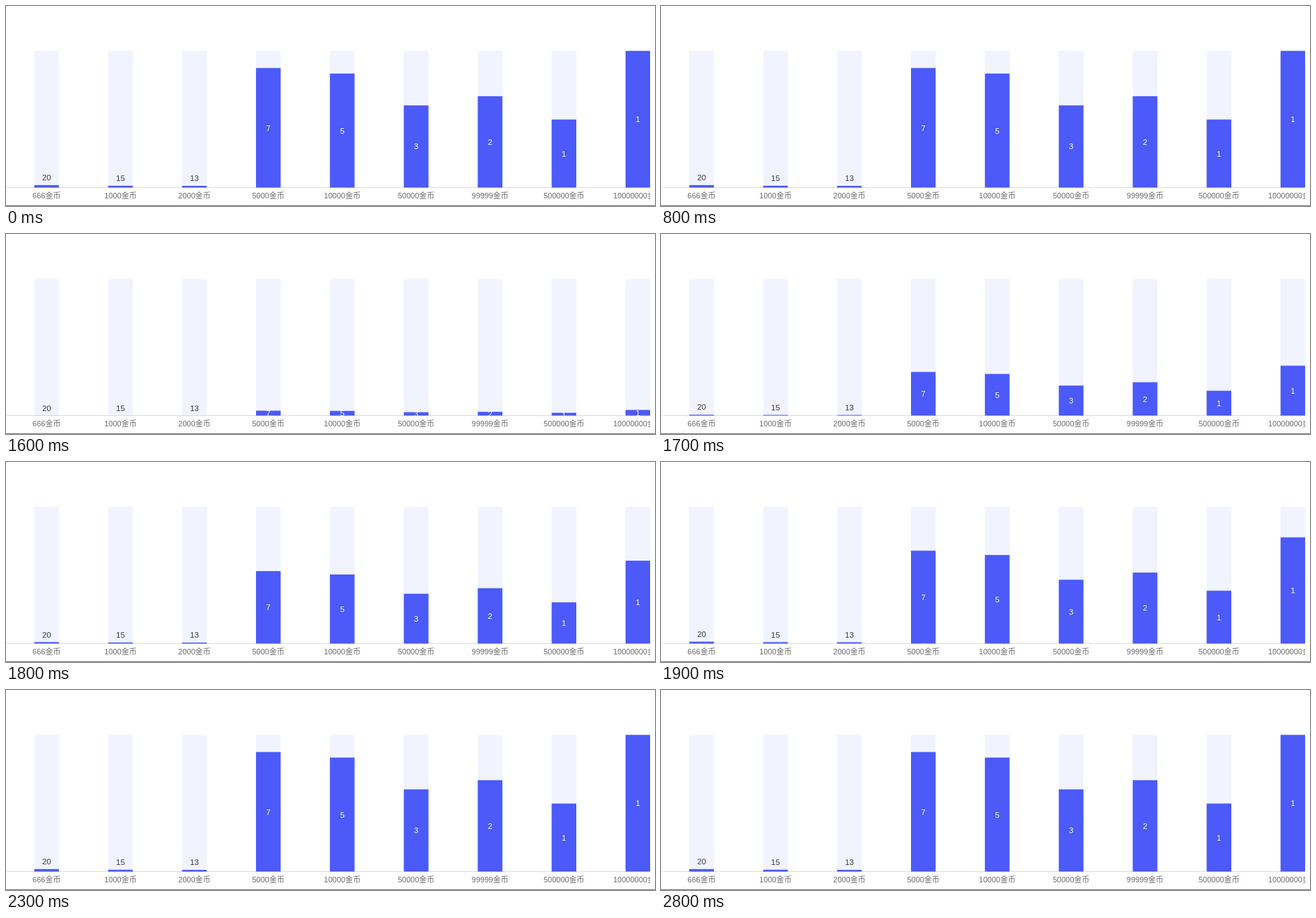
Write an HTML page that moves like this. It is 932 by 288 pixels and loops after 3300 ms.

```html
<!DOCTYPE html>
<html lang="zh">
<head>
<meta charset="utf-8">
<title>Bar chart reload</title>
<style>
  html, body { margin: 0; width: 100%; height: 100%; overflow: hidden; background: #fff; }
  svg { display: block; }
  text { text-anchor: middle; font-family: "Liberation Sans", "Noto Sans CJK SC", "Noto Sans CJK", sans-serif; }
  .axis { font-size: 11px; fill: #6a6a6d; }
  .value { font-size: 11.5px; }
</style>
</head>
<body>
<svg width="932" height="288" viewBox="0 0 932 288">
  <defs><clipPath id="view"><rect width="925" height="288"/></clipPath></defs>
  <rect width="932" height="288" fill="#fff"/>
  <g id="chart" clip-path="url(#view)">
    <rect y="261" width="925" height="1" fill="#dcdce0"/>
  </g>
  <g id="loader" fill="none" stroke="#6b6d78" stroke-width="1.5" stroke-linecap="round">
    <rect x="323.5" y="233" width="2" height="4" fill="#5c5e6a" stroke="none"/>
    <rect x="393" y="232" width="2" height="4" fill="#5c5e6a" stroke="none"/>
    <rect x="323.5" y="217" width="72" height="44.5" fill="#fcfcfe" stroke="#c6c8d4" stroke-width="1"/>
    <rect x="326.5" y="217" width="66" height="40.5" fill="#fff" stroke="#b9bbc9" stroke-width="1"/>
    <rect x="327" y="217.5" width="11.5" height="39.5" fill="#e8e9f3" stroke="none"/>
    <path d="M338.5 217.5V257" stroke="#b9bbc9" stroke-width="1"/>
    <path d="M329 222h7.5M329 225h7.5M329 228h7.5" stroke-width="1"/>
    <rect x="341" y="219.5" width="49" height="6.5" rx="1" fill="#5f616c" stroke="none"/>
    <g fill="#fff" stroke="none"><circle cx="344" cy="222.7" r="1"/><circle cx="347.3" cy="222.7" r="1"/></g>
    <g fill="#eff0f7" stroke="#cfd1dd" stroke-width="1">
      <rect x="341.5" y="228.5" width="26.5" height="25.5"/>
      <rect x="370.5" y="228.5" width="19.5" height="25.5"/>
    </g>
    <path d="M355 241.5V233.5A8 8 0 1 0 363 241.5Z" fill="#5f616c" stroke="none"/>
    <path d="M356 240.5V233A8 8 0 0 1 363.5 240.5Z" fill="#fff" stroke="none"/>
    <path d="M372.5 234h15M372.5 238.3h15M372.5 242.7h15M372.5 247h7" stroke-width="1.3"/>
    <path d="M324.5 234L311.5 217L328 200.5L333 204"/>
    <path d="M332.6 210.6A4.5 4.5 0 1 1 340 206.5"/>
    <path d="M394.3 234L398.5 212L376.5 203.5L373.5 211"/>
    <path d="M374.2 209L372.7 212.5" stroke-width="2.6"/>
    <path d="M372.7 212.5L371.5 215.5" stroke="#e08080"/>
    <g fill="#fff" stroke-width="1.2">
      <circle cx="311.5" cy="217" r="2.4"/><circle cx="328" cy="200.5" r="2.4"/>
      <circle cx="398.5" cy="212" r="2.4"/><circle cx="376.5" cy="203.5" r="2.4"/>
    </g>
  </g>
  <rect y="287" width="932" height="1" fill="#74757a"/>
</svg>
<script>
const LOOP = 3300, STEP = 100;
const LOAD_AT = 1500, GROW_AT = 1589, GROW_MS = 790, SETTLED = 2300;
const BASE = 261.5, TOP = 64.6, WIDTH = 35.4, FIRST = 58.3, PITCH = 106.14;

// amount, value, full height of the bar
const data = [
  [666, 20, 3.6], [1000, 15, 2.7], [2000, 13, 2.5],
  [5000, 7, 172.2], [10000, 5, 164.2], [50000, 3, 118.4],
  [99999, 2, 131.6], [500000, 1, 98], [10000000, 1, BASE - TOP]
];

const chart = document.getElementById("chart");
const loader = document.getElementById("loader");

function add(tag, attrs, text = "") {
  const el = document.createElementNS("http://www.w3.org/2000/svg", tag);
  for (const key in attrs) el.setAttribute(key, attrs[key]);
  el.textContent = text;
  chart.appendChild(el);
  return el;
}

const bars = data.map(([amount, value, height], i) => {
  const mid = FIRST + i * PITCH, x = mid - WIDTH / 2;
  const inside = height > 20;
  add("rect", { x, y: TOP, width: WIDTH, height: BASE - TOP, fill: "#f1f3ff" });
  const fill = add("rect", { x, width: WIDTH, fill: "#4b5af8" });
  const label = add("text", { class: "value", x: mid, fill: inside ? "#fff" : "#3a3a3e" }, value);
  add("text", { class: "axis", x: mid, y: 276.5 }, amount + "金币");
  return { height, inside, fill, label };
});

function progress(t) {
  if (t < LOAD_AT || t >= SETTLED) return 1;
  const p = Math.max(0, Math.min(1, (t - GROW_AT) / GROW_MS));
  return 1 - (1 - p) ** 3;
}

function draw(time) {
  const t = Math.floor((time % LOOP) / STEP) * STEP;
  const loading = t >= LOAD_AT && t < GROW_AT;
  chart.style.display = loading ? "none" : "";
  loader.style.display = loading ? "" : "none";
  const k = progress(t);
  for (const { height, inside, fill, label } of bars) {
    const h = height * k, y = BASE - h;
    fill.setAttribute("y", y);
    fill.setAttribute("height", h);
    label.setAttribute("y", inside ? BASE - h / 2 + 4.1 : y - 6.8);
  }
}

const start = performance.now();
function tick() {
  draw(performance.now() - start);
  requestAnimationFrame(tick);
}
draw(0);
requestAnimationFrame(tick);
</script>
</body>
</html>
```
